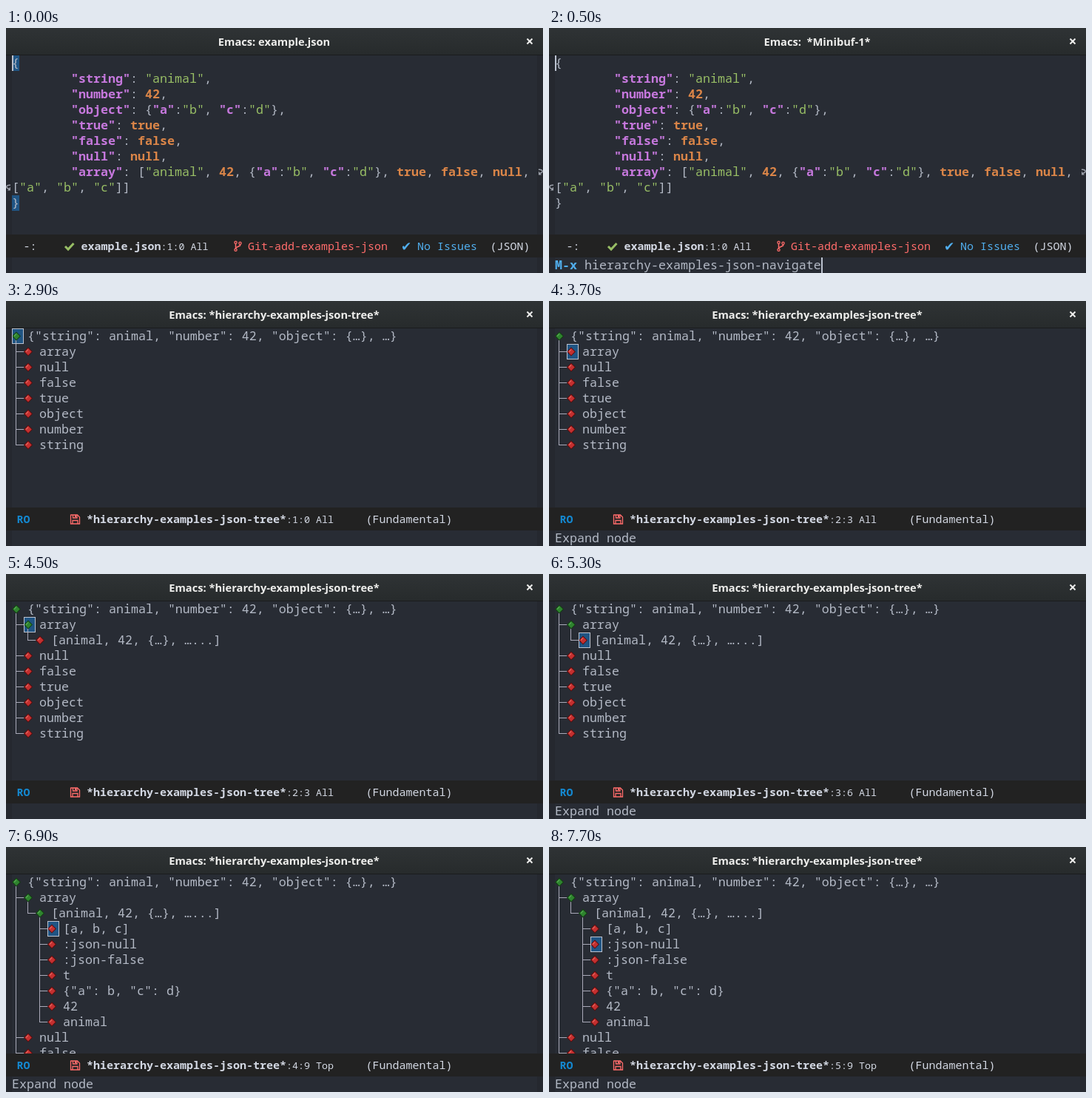
An HTML page with a canvas for the animation above (8000 ms loop, 726 px wide and 331 px high).

```html
<!DOCTYPE html>
<html lang="en">
<head>
<meta charset="utf-8">
<title>JSON tree</title>
<style>
html, body { margin: 0; width: 100%; height: 100%; overflow: hidden; background: #282c34; }
canvas { display: block; }
</style>
</head>
<body>
<canvas id="stage" width="726" height="331"></canvas>
<script>
const W = 726, H = 331, LOOP = 8000;
const TOP = 37, ROW = 21, LEFT = 8, CHAR = 10, BAR_Y = 279, ECHO_Y = 310;
const MONO = '"Noto Sans Mono", "DejaVu Sans Mono", monospace';
const C = {
  bg: '#282c34', fringe: '#25282f', bar: '#222222', fg: '#b3b9c5', bright: '#d3d8e3',
  key: '#c678dd', string: '#98be65', constant: '#da8548', red: '#ff6c6b',
  blue: '#51afef', readOnly: '#1488d0', mark: '#205584', cursor: '#bbc2cf', guide: '#a9a9b8'
};
const ctx = document.getElementById('stage').getContext('2d');

const JSON_LINES = [
  '{',
  '        "string": "animal",',
  '        "number": 42,',
  '        "object": {"a":"b", "c":"d"},',
  '        "true": true,',
  '        "false": false,',
  '        "null": null,',
  '        "array": ["animal", 42, {"a":"b", "c":"d"}, true, false, null,',
  '["a", "b", "c"]]',
  '}'
];

const leaf = label => ({ label });
const list = {
  label: '[animal, 42, {…}, …...]',
  kids: ['[a, b, c]', ':json-null', ':json-false', 't', '{"a": b, "c": d}', '42', 'animal'].map(leaf)
};
const array = { label: 'array', kids: [list] };
const root = {
  label: '{"string": animal, "number": 42, "object": {…}, …}',
  kids: [array, ...['null', 'false', 'true', 'object', 'number', 'string'].map(leaf)]
};

// open: how many levels of the first branch are expanded
const STEPS = [
  { at: 0, json: true },
  { at: 500, json: true, prompt: true },
  { at: 2100, open: 0, line: 0, depth: 0 },
  { at: 2900, open: 1, line: 0, depth: 0 },
  { at: 3700, open: 1, line: 1, depth: 1, echo: true },
  { at: 4500, open: 2, line: 1, depth: 1 },
  { at: 5300, open: 2, line: 2, depth: 2, echo: true },
  { at: 6100, open: 3, line: 2, depth: 2 },
  { at: 6900, open: 3, line: 3, depth: 3, echo: true },
  { at: 7700, open: 3, line: 4, depth: 3, echo: true }
];

function rect(x, y, w, h, color) {
  ctx.fillStyle = color;
  ctx.fillRect(x, y, w, h);
}

function text(str, x, y, color, size = 16.667, weight = 400) {
  ctx.font = `${weight} ${size}px ${MONO}`;
  ctx.fillStyle = color;
  ctx.fillText(str, x, y);
}

function stroke(points, color, width) {
  ctx.strokeStyle = color;
  ctx.lineWidth = width;
  ctx.beginPath();
  points.forEach(([x, y], i) => i ? ctx.lineTo(x, y) : ctx.moveTo(x, y));
  ctx.stroke();
}

function polygon(points, color) {
  ctx.fillStyle = color;
  ctx.beginPath();
  points.forEach(([x, y]) => ctx.lineTo(x, y));
  ctx.fill();
}

const rowY = i => TOP + ROW * i;
const baseline = i => rowY(i) + 16;

function drawTitle(title) {
  const shade = ctx.createLinearGradient(0, 0, 0, 36);
  shade.addColorStop(0, '#2f3335');
  shade.addColorStop(1, '#272b2c');
  rect(0, 0, W, 36, shade);
  rect(0, 36, W, 1, '#1a1c1d');
  ctx.font = '700 14.667px "Open Sans", "Noto Sans", sans-serif';
  ctx.fillStyle = '#eeeeec';
  ctx.textAlign = 'center';
  ctx.fillText(title, 362.5, 24);
  ctx.textAlign = 'left';
  stroke([[704.5, 14.5], [711.5, 21.5]], '#eeeeec', 2);
  stroke([[711.5, 14.5], [704.5, 21.5]], '#eeeeec', 2);
}

function wrapArrow(x, y, dir) {
  ctx.save();
  ctx.translate(x, y);
  ctx.scale(dir, 1);
  ctx.strokeStyle = '#9a9fa9';
  ctx.lineWidth = 1.5;
  ctx.beginPath();
  ctx.moveTo(2, -3.2);
  ctx.bezierCurveTo(-4.5, -4, -4.5, 1.5, 0, 1.5);
  ctx.stroke();
  polygon([[2, -1], [2, 4], [-2, 4]], '#9a9fa9');
  ctx.restore();
}

function drawJson(prompt) {
  if (!prompt) {
    rect(LEFT, rowY(0), CHAR, ROW, C.mark);
    rect(LEFT, rowY(9), CHAR, ROW, C.mark);
  }
  JSON_LINES.forEach((line, i) => {
    for (const m of line.matchAll(/"\w+"(:?)|\w+|[^"\w]+/g)) {
      const x = LEFT + m.index * CHAR, y = baseline(i), s = m[0];
      if (m[1]) {
        text(s.slice(0, -1), x, y, C.key, undefined, 700);
        text(':', x + (s.length - 1) * CHAR, y, C.fg);
      } else if (s[0] === '"') text(s, x, y, C.string);
      else if (/\w/.test(s)) text(s, x, y, C.constant, undefined, 700);
      else text(s, x, y, C.fg);
    }
  });
  rect(LEFT, rowY(0), 2, ROW, C.cursor);
  wrapArrow(722, rowY(7) + 10.5, -1);
  wrapArrow(4, rowY(8) + 10.5, 1);
}

function diamond(x, y, open) {
  const [edge, body, shine] = open
    ? ['#123f12', '#2f842f', '#58a854']
    : ['#5c0d0d', '#c43030', '#e0665e'];
  const shape = (r, color) => polygon([[x, y - r], [x + r, y], [x, y + r], [x - r, y]], color);
  shape(6, edge);
  shape(4.7, body);
  stroke([[x - 3, y], [x, y - 3]], shine, 1.2);
}

function drawTree({ open, line, depth }) {
  const opened = [root, array, list].slice(0, open);
  let count = 0;
  const isOpen = node => opened.includes(node);
  rect(LEFT + depth * 16, rowY(line), 16, ROW, C.mark);

  function visit(node, level) {
    const row = count++, y = rowY(row) + 10, x = 13 + level * 16;
    text(node.label, x + 16, baseline(row), C.fg);
    if (level) rect(x - 16, y, 12, 1, C.guide);
    if (isOpen(node)) {
      let last = row;
      for (const kid of node.kids) {
        last = count;
        visit(kid, level + 1);
      }
      rect(x, y + 5, 1, rowY(last) + 11 - (y + 5), C.guide);
    }
    diamond(x + 1, y + 0.5, isOpen(node));
  }
  visit(root, 0);

  ctx.strokeStyle = C.cursor;
  ctx.lineWidth = 1;
  ctx.strokeRect(LEFT + depth * 16 + 0.5, rowY(line) + 0.5, 15, ROW - 1);
}

function branchIcon(x, y) {
  stroke([[x, y + 3], [x, y + 10]], C.red, 1.5);
  stroke([[x + 6, y + 4], [x + 6, y + 6], [x, y + 9]], C.red, 1.5);
  for (const [dx, dy] of [[0, 1.8], [0, 11.8], [6, 2.8]]) {
    ctx.lineWidth = 1.3;
    ctx.beginPath();
    ctx.arc(x + dx, y + dy, 1.6, 0, 7);
    ctx.stroke();
  }
}

function saveIcon(x, y) {
  stroke([[x, y], [x + 9, y], [x + 12, y + 3], [x + 12, y + 12], [x, y + 12], [x, y - 0.6]], C.red, 1.3);
  stroke([[x + 3, y], [x + 3, y + 4], [x + 8.5, y + 4], [x + 8.5, y]], C.red, 1.3);
  rect(x + 5.5, y, 2, 3, C.red);
  stroke([[x + 2.5, y + 12], [x + 2.5, y + 7.5], [x + 9.5, y + 7.5], [x + 9.5, y + 12]], C.red, 1.3);
}

function drawModeLine(step) {
  const y = 300;
  const put = (s, x, color, weight) => text(s, x, y, color, 15, weight);
  const name = (s, x, pos) => {
    put(s, x, C.bright, 700);
    text(pos, x + s.length * 9, y, C.bright, 13.333);
  };
  rect(0, BAR_Y, W, ECHO_Y - BAR_Y, C.bar);
  if (step.json) {
    put('-:', 23.5, C.bright);
    stroke([[80, 295], [84, 299], [91.5, 291]], C.string, 3);
    name('example.json', 101.5, ':1:0 All');
    branchIcon(310.5, 288);
    put('Git-add-examples-json', 327, C.red);
    ctx.font = '17px "DejaVu Sans", sans-serif';
    ctx.fillStyle = C.blue;
    ctx.fillText('✔', 534, 301);
    put('No Issues', 556, C.blue);
    put('(JSON)', 654.5, C.bright);
  } else {
    put('RO', 14.5, C.readOnly, 700);
    saveIcon(87.5, 289);
    const view = step.open > 2 ? 'Top' : 'All';
    name('*hierarchy-examples-json-tree*', 109, `:${step.line + 1}:${step.depth * 3} ${view}`);
    put('(Fundamental)', 486.5, C.bright);
  }
}

function drawEcho({ prompt, echo }) {
  const y = ECHO_Y + 16;
  if (prompt) {
    const command = 'hierarchy-examples-json-navigate';
    text('M-x', LEFT, y, C.blue, undefined, 700);
    text(command, LEFT + 4 * CHAR, y, C.fg);
    rect(LEFT + (4 + command.length) * CHAR, ECHO_Y, 2, ROW, C.cursor);
  } else if (echo) {
    text('Expand node', LEFT, y, C.fg);
  }
}

function draw(step) {
  rect(0, 0, W, H, C.bg);
  rect(0, TOP, LEFT, H, C.fringe);
  rect(W - LEFT, TOP, LEFT, H, C.fringe);
  if (step.json) drawJson(step.prompt);
  else drawTree(step);
  rect(0, ECHO_Y, W, ROW, C.bg);
  rect(0, ECHO_Y, LEFT, ROW, C.fringe);
  rect(W - LEFT, ECHO_Y, LEFT, ROW, C.fringe);
  drawModeLine(step);
  drawEcho(step);
  const buffer = step.prompt ? ' *Minibuf-1*' : step.json ? 'example.json' : '*hierarchy-examples-json-tree*';
  drawTitle('Emacs: ' + buffer);
}

const start = performance.now();
function tick() {
  const t = (performance.now() - start) % LOOP;
  draw(STEPS.findLast(s => s.at <= t));
  requestAnimationFrame(tick);
}
tick();
</script>
</body>
</html>
```
